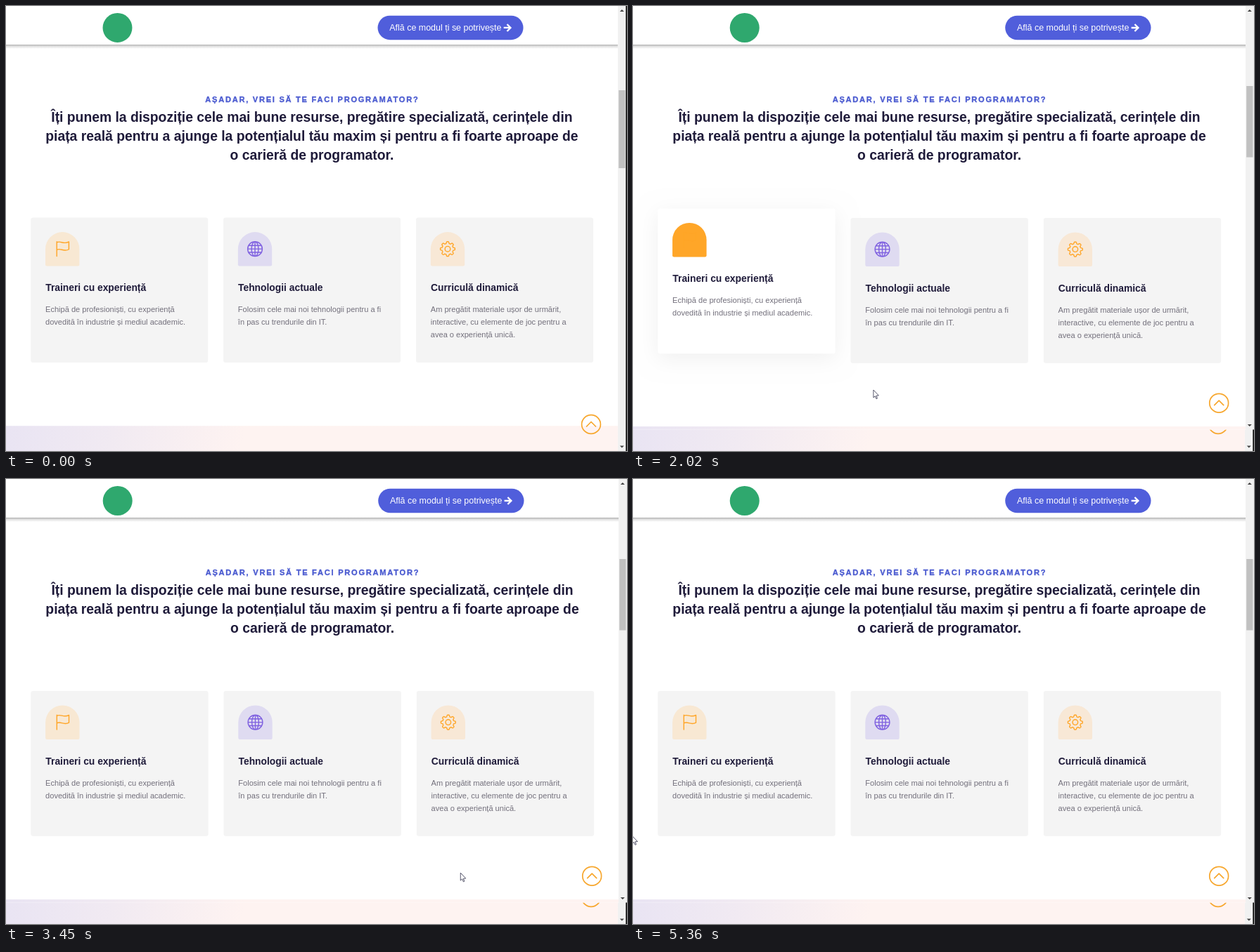
An HTML page with a canvas that plays this animation: 883x634 px, repeating every 6.1 s.

```html
<!DOCTYPE html>
<html lang="ro">
<head>
<meta charset="utf-8">
<style>
html, body { margin: 0; width: 100%; height: 100%; overflow: hidden; background: #fff; }
canvas { display: block; width: 883px; height: 634px; }
</style>
</head>
<body>
<canvas id="stage" width="883" height="634"></canvas>
<script>
const ctx = document.getElementById('stage').getContext('2d');
const W = 883, H = 634, LOOP = 6100, TAU = Math.PI * 2;
const SANS = '"Liberation Sans", Arial, sans-serif';
const NAVY = '#1f1b3a', GREY = '#73707c', BLUE = '#505edb', ORANGE = '#ffa526', PURPLE = '#7f61e0';

// Motion is sampled in short steps that restart with each burst.
const BURSTS = [70, 1150, 1940, 3060, 3690, 4510, 5200], STEP = 76.6;

const CURSOR = [
  [70, 112, 522], [1149, 112, 522], [1150, 122, 504], [1400, 165, 482], [1690, 205, 470],
  [1939, 205, 470], [1940, 255, 505], [2016, 341, 547], [2180, 440, 522], [2399, 520, 477],
  [3059, 520, 477], [3140, 550, 508], [3300, 610, 548], [3440, 645, 561], [3520, 665, 561],
  [3595, 700, 554], [3690, 716, 524], [3840, 737, 481], [4509, 737, 481], [4590, 712, 545],
  [4670, 675, 572], [4890, 560, 572], [5120, 442, 568], [5200, 292, 550], [5350, -1.5, 508.5]
];

const CARDS = [
  { x: 35.3, on: 1135, off: 2010, color: ORANGE, pale: '#f8e8d3', icon: flag, title: 'Traineri cu experiență',
    lines: ['Echipă de profesioniști, cu experiență', 'dovedită în industrie și mediul academic.'] },
  { x: 309.5, on: 2150, off: 3060, color: PURPLE, pale: '#dfdbf1', icon: globe, title: 'Tehnologii actuale',
    lines: ['Folosim cele mai noi tehnologii pentru a fi', 'în pas cu trendurile din IT.'] },
  { x: 583.8, on: 3640, off: 4510, color: ORANGE, pale: '#f8e8d6', icon: gear, title: 'Curriculă dinamică',
    lines: ['Am pregătit materiale ușor de urmărit,', 'interactive, cu elemente de joc pentru a', 'avea o experiență unică.'] }
];

const clamp = v => Math.max(0, Math.min(1, v));
const ease = v => 1 - (1 - clamp(v) ** 1.3) ** 3;

function stepped(t) {
  const start = BURSTS.filter(b => b <= t).pop() ?? 0;
  return start + Math.floor((t - start) / STEP) * STEP;
}

function cursorAt(t) {
  const i = CURSOR.findIndex(k => k[0] > t);
  if (i < 0) return CURSOR[CURSOR.length - 1].slice(1);
  if (i === 0) return CURSOR[0].slice(1);
  const [t0, x0, y0] = CURSOR[i - 1], [t1, x1, y1] = CURSOR[i];
  const k = (t - t0) / (t1 - t0);
  return [x0 + (x1 - x0) * k, y0 + (y1 - y0) * k];
}

function text(str, x, y, size, color, { bold = false, align = 'left', spacing = 0, heavy = 0 } = {}) {
  ctx.font = `${bold ? 'bold ' : ''}${size}px ${SANS}`;
  ctx.textAlign = align;
  ctx.letterSpacing = spacing + 'px';
  ctx.fillStyle = ctx.strokeStyle = color;
  ctx.fillText(str, x, y);
  if (heavy) {
    ctx.lineWidth = heavy;
    ctx.strokeText(str, x, y);
  }
}

function box(x, y, w, h, r, color) {
  ctx.beginPath();
  ctx.roundRect(x, y, w, h, r);
  ctx.fillStyle = color;
  ctx.fill();
}

function rect(x, y, w, h, color) {
  ctx.fillStyle = color;
  ctx.fillRect(x, y, w, h);
}

function line(...pts) {
  ctx.moveTo(pts[0], pts[1]);
  for (let i = 2; i < pts.length; i += 2) ctx.lineTo(pts[i], pts[i + 1]);
}

// Icons are drawn around the origin.
function flag() {
  line(-8, 10.4, -8, -10.4);
  ctx.moveTo(-8, -9.2);
  ctx.bezierCurveTo(-2.5, -12.4, 1.5, -5.8, 9.2, -10.2);
  ctx.lineTo(9.2, 0.6);
  ctx.bezierCurveTo(1.5, 4.8, -2.5, -2, -8, 1.2);
}

function globe() {
  ctx.arc(0, 0, 10.4, 0, TAU);
  ctx.moveTo(4.9, 0);
  ctx.ellipse(0, 0, 4.9, 10.4, 0, 0, TAU);
  line(0, -10.4, 0, 10.4);
  line(-10.4, 0, 10.4, 0);
  line(-9.2, -4.9, 9.2, -4.9);
  line(-9.2, 4.9, 9.2, 4.9);
}

function gear() {
  for (let i = 0; i < 160; i++) {
    const a = i / 160 * TAU;
    const r = 9.2 + 1.2 * Math.max(-1, Math.min(1, 1.8 * Math.cos(8 * a)));
    ctx.lineTo(r * Math.cos(a), r * Math.sin(a));
  }
  ctx.closePath();
  ctx.moveTo(3.8, 0);
  ctx.arc(0, 0, 3.8, 0, TAU);
}

function card(c, t) {
  const p = t < c.off ? ease((t - c.on) / 400) : 1 - ease((t - c.off) / 400);
  const hovered = t > c.on + 60 && t < c.off;
  ctx.save();
  ctx.translate(c.x, 302 - 13.7 * p);
  ctx.save();
  if (p > 0) {
    ctx.shadowColor = `rgba(0,0,0,${0.06 * p})`;
    ctx.shadowBlur = 30;
    ctx.shadowOffsetY = 7;
  }
  const g = 244 + 11 * p;
  box(0, 0, 252.3, 206.7, 3, `rgb(${g},${g},${g})`);
  ctx.restore();

  const radii = [24.2, 24.2, 2, 2];
  box(20.8, 20.5, 48.4, 48.4, radii, c.pale);
  ctx.globalAlpha = p;
  box(20.8, 20.5, 48.4, 48.4, radii, c.color);
  ctx.globalAlpha = 1;

  ctx.save();
  ctx.translate(45, 44.6);
  ctx.beginPath();
  c.icon();
  ctx.lineWidth = 1.4;
  ctx.lineJoin = ctx.lineCap = 'round';
  ctx.strokeStyle = hovered ? '#fff' : c.color;
  ctx.stroke();
  ctx.restore();

  text(c.title, 21, 105, 13.85, NAVY, { bold: true });
  c.lines.forEach((s, i) => text(s, 20.8, 135 + 18 * i, 11.07, GREY));
  ctx.restore();
}

function header() {
  const shade = ctx.createLinearGradient(0, 55, 0, 61);
  shade.addColorStop(0, '#b0b0b0');
  shade.addColorStop(0.4, '#dedede');
  shade.addColorStop(1, '#fff');
  rect(0, 55, 871, 6, shade);
  rect(0, 0, 871, 55, '#fff');

  ctx.beginPath();
  ctx.arc(158.7, 31, 21, 0, TAU);
  ctx.fillStyle = '#2fa86e';
  ctx.fill();

  box(529.2, 13.8, 207.3, 34.4, 17.2, BLUE);
  text('Află ce modul ți se potrivește', 546, 35.2, 12.48, '#fff');
  ctx.beginPath();
  line(708.6, 31, 718, 31);
  line(713.4, 26, 718.4, 31, 713.4, 36);
  ctx.lineWidth = 2.3;
  ctx.lineCap = 'butt';
  ctx.lineJoin = 'miter';
  ctx.strokeStyle = '#fff';
  ctx.stroke();
}

function page(t) {
  rect(0, 0, 872, 640, '#fff');
  const band = ctx.createLinearGradient(0, 600, 330, 660);
  band.addColorStop(0, '#e9e4f3');
  band.addColorStop(0.45, '#f1eaf2');
  band.addColorStop(1, '#fef3f1');
  rect(0, 599, 871, 40, band);
  header();
  text('AȘADAR, VREI SĂ TE FACI PROGRAMATOR?', 283.7, 137, 11.1, '#4b5bd0',
    { bold: true, spacing: 1.74, heavy: 0.35 });
  [
    'Îți punem la dispoziție cele mai bune resurse, pregătire specializată, cerințele din',
    'piața reală pentru a ajunge la potențialul tău maxim și pentru a fi foarte aproape de',
    'o carieră de programator.'
  ].forEach((s, i) => text(s, 435.5, 165.4 + 27 * i, 19.34, NAVY, { bold: true, align: 'center' }));
  CARDS.forEach(c => card(c, t));
}

function topButton(x, y) {
  ctx.beginPath();
  ctx.arc(x, y, 13.4, 0, TAU);
  line(x - 6.5, y + 3, x, y - 3.5, x + 6.5, y + 3);
  ctx.lineWidth = 1.7;
  ctx.lineCap = ctx.lineJoin = 'round';
  ctx.strokeStyle = '#f7a72e';
  ctx.stroke();
}

function arrow(x, y, dir) {
  ctx.beginPath();
  line(x - 3, y + 1.5 * dir, x + 3, y + 1.5 * dir, x, y - 1.5 * dir);
  ctx.fillStyle = '#444';
  ctx.fill();
}

function scrollbar(x, w, top, size, bottom) {
  rect(x, 0, w, H, '#f1f1f1');
  rect(x + 1.2, top, 9.3, size, '#c1c1c1');
  arrow(x + 5.8, 6.5, 1);
  arrow(x + 5.8, bottom, -1);
}

function firstView() {
  rect(0, 0, W, H, '#fff');
  ctx.save();
  ctx.scale(0.9987, 0.9987);
  page(0);
  ctx.restore();
  scrollbar(870, 11.3, 120, 111, 628);
  rect(881.3, 0, 1.7, H, '#111');
  topButton(832, 596);
}

function pointer([x, y]) {
  ctx.save();
  ctx.translate(x, y);
  ctx.beginPath();
  line(0.5, 0.5, 0.5, 11, 2.9, 8.9, 4.6, 12.8, 6.1, 12.1, 4.5, 8.3, 7.6, 8.1);
  ctx.closePath();
  ctx.fillStyle = '#fff';
  ctx.fill();
  ctx.lineWidth = 0.9;
  ctx.lineJoin = 'miter';
  ctx.strokeStyle = '#44445c';
  ctx.stroke();
  ctx.restore();
}

function draw(now) {
  const t = now % LOOP;
  firstView();
  if (t >= 70) {
    // The live view is shorter than the stage; the strip below it stays.
    const s = stepped(t);
    ctx.save();
    ctx.beginPath();
    ctx.rect(0, 0, W, 603.5);
    ctx.clip();
    page(s);
    scrollbar(871, 12, 114, 101.5, 597.5);
    topButton(833.2, 565.7);
    pointer(cursorAt(s));
    ctx.restore();
  }
}

const begin = performance.now();
function tick() {
  draw(performance.now() - begin);
  requestAnimationFrame(tick);
}
tick();
</script>
</body>
</html>
```
